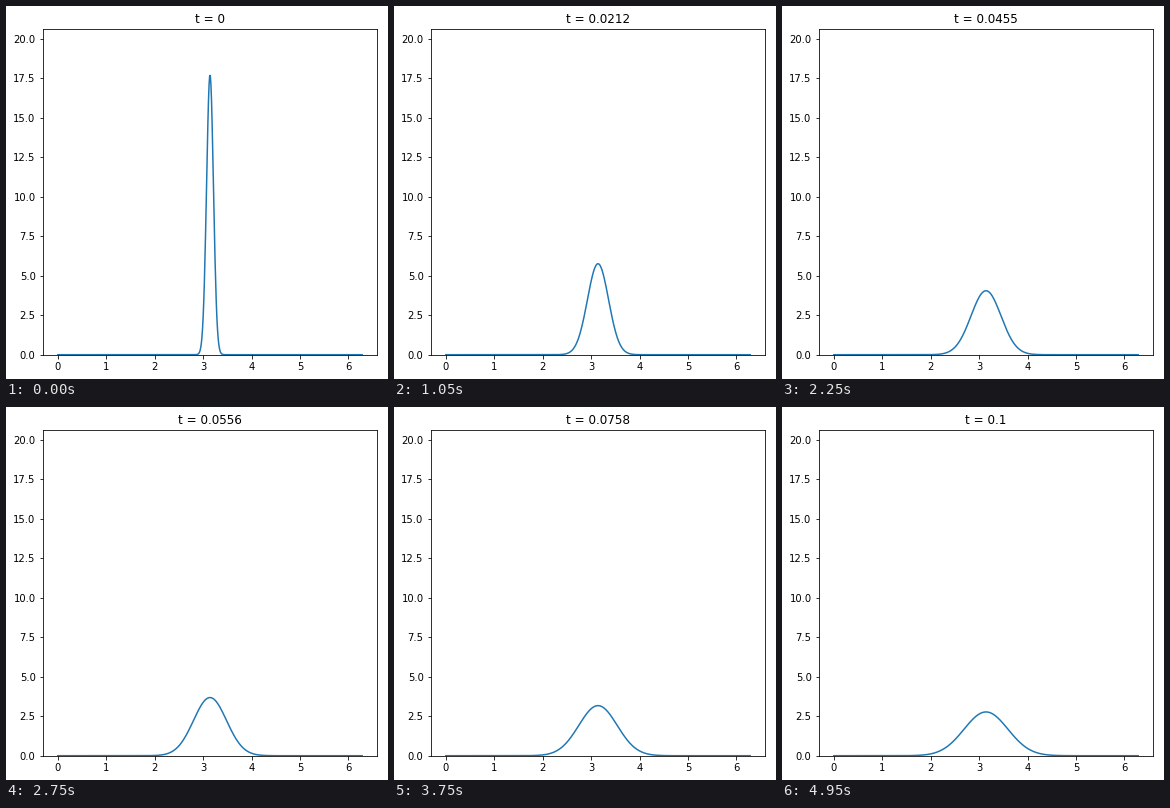
These frames come from a looping animation (382 px wide and 373 px high, 5 s). A matplotlib script:

```python
import numpy as np
import matplotlib.pyplot as plt
from matplotlib.animation import FuncAnimation

W, H, DPI = 382, 373, 72
FRAMES, INTERVAL = 100, 50
T_END = 0.1
SHARPNESS = 100  # initial pulse is proportional to exp(-SHARPNESS * (x - pi)^2)

plt.rcParams["font.family"] = "DejaVu Sans"

x = np.linspace(0, 2 * np.pi, 512)
times = np.linspace(0, T_END, FRAMES)


def heat(x, t):
    """Gaussian pulse of total mass pi spreading under u_t = u_xx."""
    spread = 1 + 4 * SHARPNESS * t
    peak = np.sqrt(np.pi * SHARPNESS / spread)
    return peak * np.exp(-SHARPNESS * (x - np.pi) ** 2 / spread)


# The tiny extra keeps the pixel size from rounding down.
fig = plt.figure(figsize=((W + 1e-6) / DPI, (H + 1e-6) / DPI), dpi=DPI,
                 facecolor="white")
ax = fig.add_axes([36.6 / W, 24.3 / H, 334.8 / W, 326.16 / H])
margin = 0.05 * 2 * np.pi
ax.set_xlim(-margin, 2 * np.pi + margin)
ax.set_ylim(0, 20.63)
ax.set_xticks(range(7))
ax.set_yticks(np.arange(0, 20.1, 2.5))
line, = ax.plot(x, heat(x, 0), color="#1f77b4", lw=1.5)
title = ax.set_title("t = 0", fontsize=12, pad=6)


def update(i):
    t = times[i]
    line.set_ydata(heat(x, t))
    title.set_text(f"t = {t:.3g}")
    return line, title


anim = FuncAnimation(fig, update, frames=FRAMES, interval=INTERVAL,
                     repeat=True, repeat_delay=0, blit=False)
plt.show()
```
